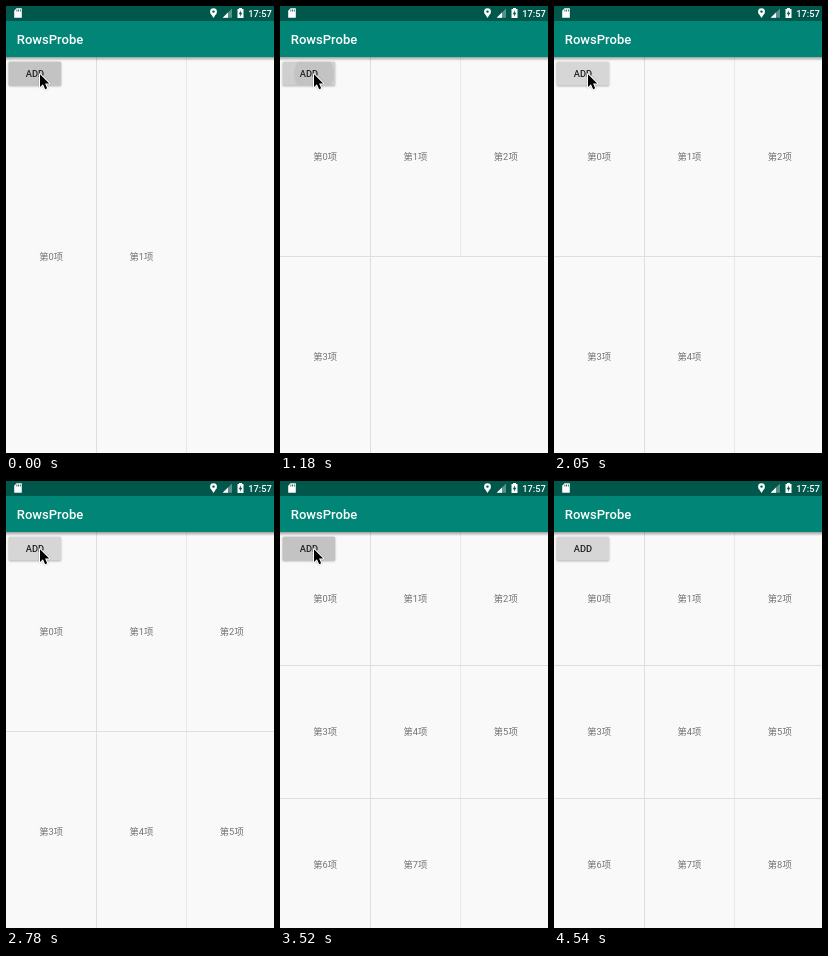
An HTML page with a canvas for the animation above (4690 ms loop, 268 by 447 pixels).

```html
<!DOCTYPE html>
<html lang="zh">
<head>
<meta charset="utf-8">
<style>
html, body { margin: 0; width: 100%; height: 100%; overflow: hidden; background: #f9f9f9; }
canvas { display: block; }
</style>
</head>
<body>
<canvas id="stage" width="268" height="447"></canvas>
<script>
const ctx = document.getElementById('stage').getContext('2d');
const LOOP = 4690, TOP = 51.3, GRID_HEIGHT = 399, COLUMN = 90.3;
const LONG = 145, SHORT = 60, QUICK = 0;
const FONT = 'Roboto, "Noto Sans CJK SC", "Noto Sans CJK", sans-serif';

// Each tap adds an item; its lead is how long the button was already held down
const taps = [
  [0, LONG], [440, SHORT], [1180, QUICK], [1760, LONG],
  [2200, QUICK], [2930, SHORT], [3520, LONG], [4100, LONG]
].map(([time, lead]) => ({ time, lead }));

// The pointer rests on the button, then jumps along this path and vanishes
const LEAVE = 4100, JUMP = 145;
const path = [[34, 68.2], [76, 133.8], [226, 381.8], [226, 403.8]];

function rect(color, x, y, w, h) {
  ctx.fillStyle = color;
  ctx.fillRect(x, y, w, h);
}

function circle(color, x, y, radius) {
  ctx.fillStyle = color;
  ctx.beginPath();
  ctx.arc(x, y, radius, 0, 2 * Math.PI);
  ctx.fill();
}

function polygon(color, ...points) {
  ctx.fillStyle = color;
  ctx.beginPath();
  points.forEach(([x, y]) => ctx.lineTo(x, y));
  ctx.closePath();
  ctx.fill();
}

function text(string, x, y, size, color, weight = 400, align = 'center') {
  ctx.font = `${weight} ${size}px ${FONT}`;
  ctx.textAlign = align;
  ctx.fillStyle = color;
  ctx.fillText(string, x, y);
}

function drawBars() {
  const shadow = ctx.createLinearGradient(0, 51, 0, 55);
  shadow.addColorStop(0, 'rgba(0,0,0,.36)');
  shadow.addColorStop(1, 'rgba(0,0,0,0)');
  rect(shadow, 0, 51, 268, 4);
  rect('#008577', 0, 15, 268, 36);
  rect('#00574b', 0, 0, 268, 15);
  text('RowsProbe', 10.8, 38.3, 13.04, '#fff', 500, 'left');
  text('17:57', 265.8, 11, 9.3, '#fff', 500, 'right');

  // Memory card
  polygon('#fff', [10.5, 2.3], [15.8, 2.3], [15.8, 11.8], [8.2, 11.8], [8.2, 4.8]);
  for (let i = 0; i < 3; i++) rect('#00574b', 10.5 + 1.7 * i, 3.5, .8, 2);

  // Location pin
  circle('#fff', 207.5, 5.6, 3.4);
  polygon('#fff', [204.4, 7], [210.6, 7], [207.5, 12]);
  circle('#00574b', 207.5, 5.6, 1.2);

  // Signal and battery
  polygon('rgba(255,255,255,.35)', [226, 2.5], [226, 11.8], [216.7, 11.8]);
  polygon('#fff', [222, 6.5], [222, 11.8], [216.7, 11.8]);
  rect('#fff', 233, 2, 3, 1);
  rect('#fff', 231.5, 3, 6, 9);
  polygon('#00574b', [235, 4.2], [232.7, 8.2], [234.2, 8.2], [234, 10.8], [236.3, 6.8], [234.8, 6.8]);
}

function drawGrid(count) {
  const rows = Math.ceil(count / 3), height = GRID_HEIGHT / rows;
  for (let i = 0; i < count; i++) {
    const column = i % 3, y = TOP + Math.floor(i / 3) * height;
    const edge = Math.floor((column + 1) * COLUMN);
    rect(column ? '#e8e8e8' : '#dedede', edge, Math.floor(y), 1, Math.ceil(height));
    text(`第${i}项`, (column + .5) * COLUMN, y + height / 2 + 3.4, 9.35, '#737373');
  }
  for (let row = 1; row < rows; row++) rect('#dedede', 0, Math.floor(TOP + row * height), 268, 1);
}

function drawButton(t) {
  const { time, lead } = taps.findLast(tap => tap.time - tap.lead <= t);
  const age = t - time + lead;
  const pressed = t < time + 140 + lead;
  const lift = age < LONG ? Math.sin(Math.PI * age / LONG) : 0;

  ctx.save();
  ctx.beginPath();
  ctx.roundRect(2.7, 55.8, 52.4, 23.8, 1.3);
  ctx.shadowColor = 'rgba(0,0,0,.3)';
  ctx.shadowBlur = 2 + 2 * lift;
  ctx.shadowOffsetY = .6 + lift;
  ctx.fillStyle = pressed ? '#cfcfcf' : '#d6d6d6';
  ctx.fill();
  ctx.shadowColor = 'transparent';
  ctx.clip();
  if (pressed) circle('#c3c3c3', 34, 68, 20 + age / 4);
  ctx.restore();
  text('ADD', 29, 71, 9.3, '#212121', 500);
}

function drawPointer(t) {
  const tip = path[Math.max(0, Math.floor((t - LEAVE) / JUMP) + 1)];
  if (!tip) return;
  const arrow = [[0, 0], [0, 14], [3.2, 11], [5.6, 16.3], [7.8, 15.3], [5.5, 10.2], [10, 10]];
  ctx.save();
  ctx.translate(...tip);
  ctx.scale(.92, .92);
  polygon('#000', ...arrow);
  ctx.strokeStyle = '#fff';
  ctx.lineWidth = 2.2;
  ctx.lineJoin = 'round';
  ctx.shadowColor = 'rgba(0,0,0,.3)';
  ctx.shadowBlur = 1.5;
  ctx.stroke();
  ctx.shadowColor = 'transparent';
  polygon('#000', ...arrow);
  ctx.restore();
}

function draw(t) {
  rect('#f9f9f9', 0, 0, 268, 447);
  drawGrid(1 + taps.filter(tap => tap.time <= t).length);
  drawBars();
  drawButton(t);
  drawPointer(t);
}

let start;
function frame(now) {
  start ??= now;
  draw((now - start) % LOOP);
  requestAnimationFrame(frame);
}
requestAnimationFrame(frame);
</script>
</body>
</html>
```
